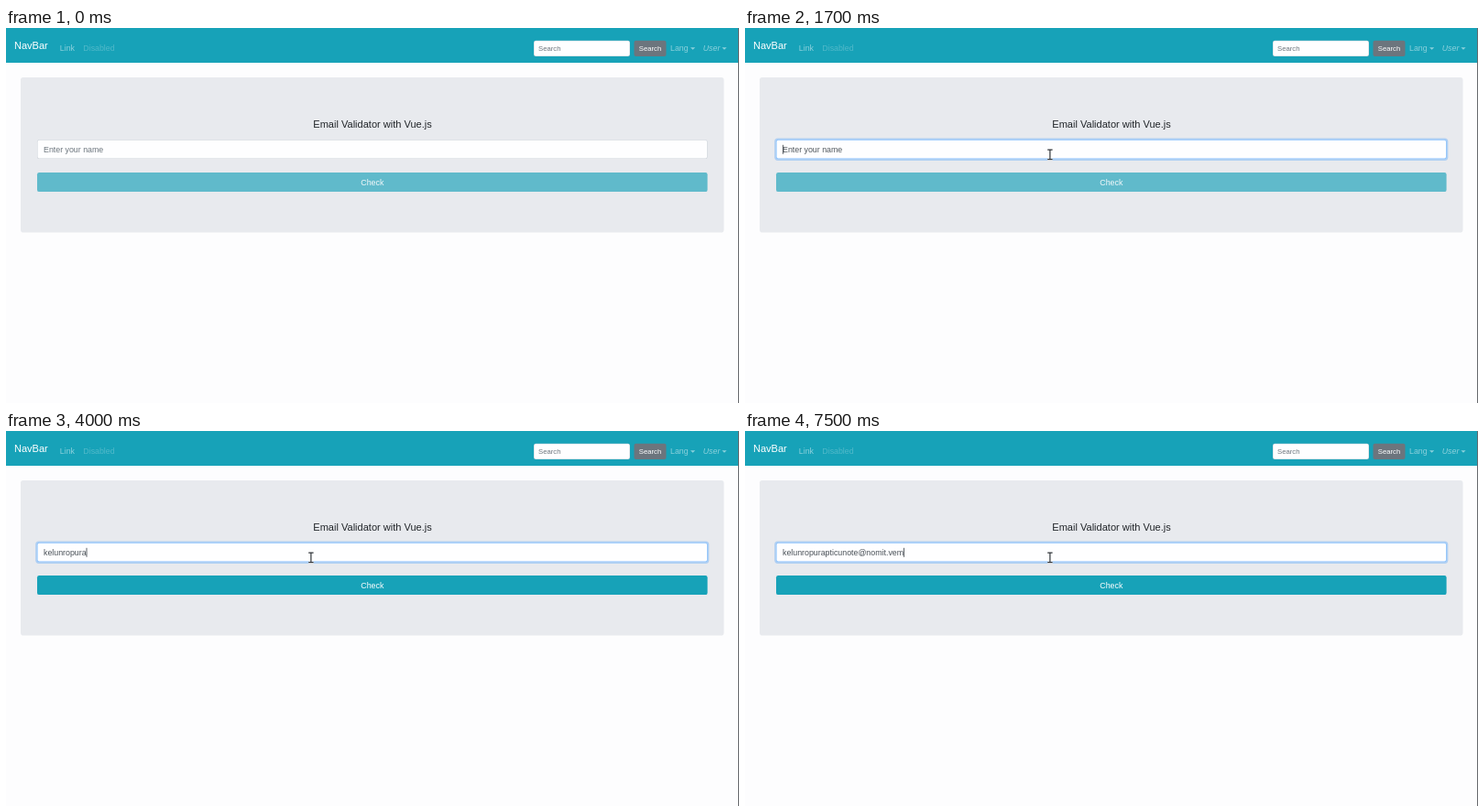
Animation of 800x410 px, one loop 8 s. Source, as an HTML page with a canvas:

```html
<!DOCTYPE html>
<html lang="en">
<head>
<meta charset="utf-8">
<title>Email Validator</title>
<style>
  html, body { margin: 0; width: 100%; height: 100%; overflow: hidden; background: #fdfdfe; }
  canvas { display: block; }
</style>
</head>
<body>
<canvas id="stage" width="800" height="410"></canvas>
<script>
const ctx = document.getElementById('stage').getContext('2d');
const LOOP = 8000, STEP = 100;
const ZOOM = 0.5515; // page pixels to stage pixels
const TEAL = '#17a2b8', GREY = '#6c757d', DARK = '#495057';
const EMAIL = 'kelunropurapticunote@nomit.vem';

// Time of each edit in tenths of a second, and the letters present after it.
const TYPING = [
  [18, 1], [19, 2], [21, 3], [24, 4], [25, 5], [26, 6], [28, 7],
  [35, 8], [37, 9], [40, 11], [43, 12], [44, 13], [45, 14], [46, 15],
  [48, 17], [49, 18], [51, 19], [52, 20], [57, 21], [59, 22], [61, 23],
  [62, 24], [63, 25], [65, 26], [66, 27], [72, 28], [73, 29], [75, 30]
];
const CARET_OFF = [[1300, 1700], [3300, 3500], [5600, 5700], [6900, 7200]];

const clamp = v => Math.max(0, Math.min(1, v));
const mix = (a, b, k) => a + (b - a) * k;

function box(x, y, w, h, r, fill) {
  ctx.beginPath();
  ctx.roundRect(x, y, w, h, r);
  ctx.fillStyle = fill;
  ctx.fill();
}

// Draws text at page size and returns its width on the stage.
function text(str, x, y, color, { size = 16, align = 'left', style = '' } = {}) {
  ctx.save();
  ctx.translate(x, y);
  ctx.scale(ZOOM, ZOOM);
  ctx.font = `${style} ${size}px "Liberation Sans", Arial, sans-serif`;
  ctx.textAlign = align;
  ctx.fillStyle = color;
  ctx.fillText(str, 0, 0);
  const width = ctx.measureText(str).width * ZOOM;
  ctx.restore();
  return width;
}

function field(x, y, w, h, border) {
  box(x, y, w, h, 2.2, border);
  box(x + 0.55, y + 0.55, w - 1.1, h - 1.1, 1.7, '#fefeff');
}

function dropMark(x, y, color) {
  ctx.fillStyle = color;
  ctx.beginPath();
  ctx.moveTo(x, y);
  ctx.lineTo(x + 5.2, y);
  ctx.lineTo(x + 2.6, y + 2.6);
  ctx.fill();
}

function navBar() {
  const faded = 'rgba(255,255,255,.5)';
  ctx.fillStyle = TEAL;
  ctx.fillRect(0, 0, 800, 38);
  text('NavBar', 9, 22.8, '#fff', { size: 20 });
  text('Link', 58.8, 25.4, faded);
  text('Disabled', 84.3, 25.4, 'rgba(255,255,255,.25)');
  field(576, 13.7, 105, 17.3, '#ced4da');
  text('Search', 581, 25.1, GREY, { size: 14 });
  box(685.5, 13.7, 35, 17.3, 2, GREY);
  text('Search', 703, 25.1, '#fff', { size: 14, align: 'center' });
  text('Lang', 725, 25.4, faded);
  dropMark(747, 21.2, faded);
  text('User', 760.7, 25.4, faded, { style: 'italic' });
  dropMark(781.4, 21.2, faded);
}

function form(t) {
  const focused = t >= 900;
  const glow = clamp((t - 900) / 200);
  const edit = TYPING.filter(([at]) => at * 100 <= t).pop();
  const typed = EMAIL.slice(0, edit ? edit[1] : 0);

  box(16, 54, 767.5, 169.6, 2.8, '#e8eaee');
  text('Email Validator with Vue.js', 400, 108.7, '#212529', { size: 20, align: 'center' });

  if (glow) box(32.2, 120.5, 735.1, 24.4, 3.6, `rgba(0,123,255,${0.25 * glow})`);
  const border = [[206, 128], [212, 189], [218, 255]].map(([a, b]) => Math.round(mix(a, b, glow)));
  field(34, 122.3, 731.6, 20.8, `rgb(${border})`);

  let caretX = 41;
  if (typed) caretX += text(typed, 41, 135.9, DARK);
  else text('Enter your name', 41, 135.9, focused ? '#50575d' : GREY);
  if (focused && !CARET_OFF.some(([from, to]) => t >= from && t < to)) {
    ctx.fillStyle = '#343a40';
    ctx.fillRect(caretX, 127.8, 0.8, 10);
  }

  box(34, 158.1, 731.6, 21, 2.2, typed ? TEAL : '#60bacb');
  text('Check', 399.8, 171.6, typed ? '#fff' : '#f5f9fb', { align: 'center' });
}

function outlined(lineWidth, path) {
  ctx.lineJoin = 'round';
  for (const [color, extra] of [['#fff', 1.2], ['#30343a', 0]]) {
    ctx.strokeStyle = color;
    ctx.lineWidth = lineWidth + extra;
    ctx.beginPath();
    path();
    ctx.stroke();
  }
}

function pointer(t) {
  if (t < 100) return;
  const k = 1 - (1 - clamp((t - 100) / 700)) ** 2;
  const settle = clamp((t - 900) / 300);
  ctx.save();
  ctx.translate(mix(763, 333.4, k) - 0.5 * settle, mix(244, 139, k) - 0.7 * settle);
  if (k > 0.95) {
    outlined(1.2, () => {
      ctx.moveTo(-2.7, -5.2);
      ctx.lineTo(2.7, -5.2);
      ctx.moveTo(0, -5.2);
      ctx.lineTo(0, 5.4);
      ctx.moveTo(-2.7, 5.4);
      ctx.lineTo(2.7, 5.4);
    });
  } else {
    outlined(0.8, () => {
      ctx.moveTo(0, 0);
      ctx.lineTo(0, 9.5);
      ctx.lineTo(2.2, 7.4);
      ctx.lineTo(4, 11);
      ctx.lineTo(5.3, 10.4);
      ctx.lineTo(3.7, 7);
      ctx.lineTo(6.7, 6.8);
      ctx.closePath();
    });
    ctx.fillStyle = '#222';
    ctx.fill();
  }
  ctx.restore();
}

function draw(now) {
  const t = Math.floor((now % LOOP) / STEP) * STEP;
  ctx.fillStyle = '#fdfdfe';
  ctx.fillRect(0, 0, 800, 410);
  navBar();
  form(t);
  pointer(t);
  ctx.fillStyle = '#66686d';
  ctx.fillRect(799, 0, 1, 410);
}

const start = performance.now();
function tick() {
  draw(performance.now() - start);
  requestAnimationFrame(tick);
}
tick();
</script>
</body>
</html>
```
